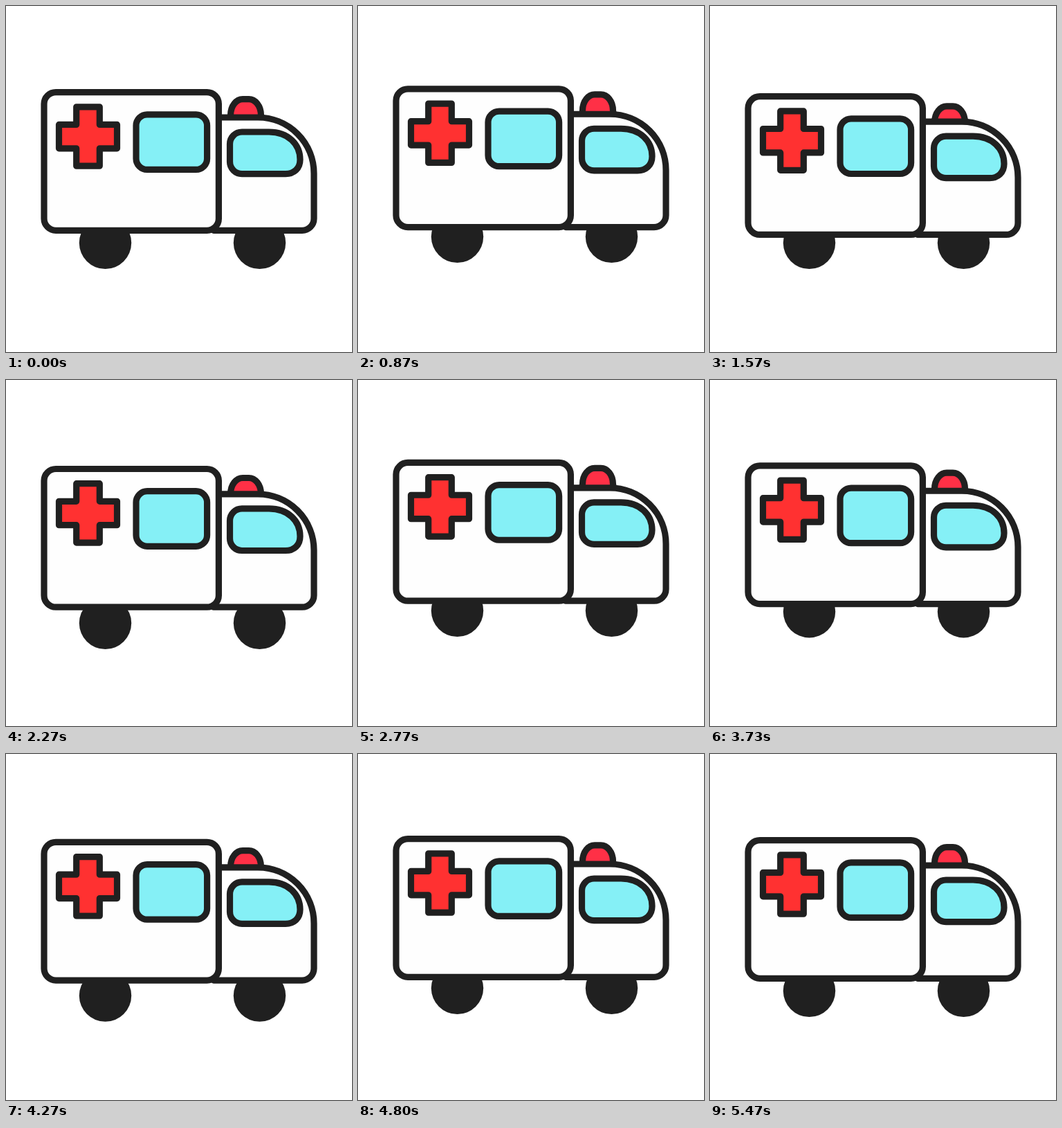
Animation, 500 px wide and 500 px high, one loop 5.83 s. Source, as an HTML page:

```html
<!DOCTYPE html>
<html lang="en">
<head>
<meta charset="utf-8">
<title>Ambulance</title>
<style>
html, body { margin: 0; width: 100%; height: 100%; overflow: hidden; background: #fff; }
svg { display: block; width: 100vw; height: 100vh; }
.ink { stroke: #202020; stroke-width: 9.2; stroke-linejoin: round; }
</style>
</head>
<body>
<svg viewBox="0 0 500 500">
  <g id="wheels" fill="#202020">
    <circle cx="143.5" cy="342.3" r="37.7"/>
    <circle cx="366.5" cy="342.3" r="37.7"/>
  </g>
  <path id="lamp" class="ink" fill="#ff3046" d="M321 176L324.5 158C324.5 144 333 134.6 342 134.6h9C360 134.6 368.5 144 368.5 158L372 176Z"/>
  <g id="body" class="ink" fill="#fefefe">
    <path d="M300 161H364A81 81 0 0 1 445 242V307.3a17 17 0 0 1-17 17H300Z"/>
    <rect x="55" y="124.6" width="252.4" height="199.7" rx="17"/>
    <path fill="#ff3131" d="M101.7 145.8h33.6v25.6h25.2v34.4h-25.2v25.4h-33.6v-25.4h-25.2v-34.4h25.2Z"/>
    <rect fill="#85f0f6" x="188" y="156.8" width="102.6" height="79.6" rx="16"/>
    <path fill="#85f0f6" d="M341 182H380C408 182 425 200 425 222C425 235 416 242.6 404 242.6H341a17.5 17.5 0 0 1-17.5-17.5V199.5a17.5 17.5 0 0 1 17.5-17.5Z"/>
  </g>
</svg>
<script>
const LOOP = 5830, STEP = 66;
const bars = [100, 730, 1370, 2000, 2670, 3300, 3930, 4570, 5200];

// time in ms -> bounce cycles completed
const cycles = [[100, 0], [870, 0.75], [3200, 3.25], [3300, 3.25], [4270, 4.25], [5470, 5.42]];

const parts = [
  { id: 'wheels', amp: 9, lag: 0, mid: 0 },
  { id: 'body', amp: 8, lag: 0.153, mid: -0.5 },
  { id: 'lamp', amp: 12.5, lag: 0.153, mid: 0 }
].map(p => ({ ...p, el: document.getElementById(p.id) }));

const clamp = v => Math.min(1, Math.max(0, v));

function phaseAt(t) {
  let i = 1;
  while (i < cycles.length - 1 && t > cycles[i][0]) i++;
  const [t0, c0] = cycles[i - 1], [t1, c1] = cycles[i];
  return c0 + (c1 - c0) * clamp((t - t0) / (t1 - t0));
}

// hold each pose for one step, restarting the count at every bar
function snap(t) {
  const start = bars.filter(b => b <= t).pop();
  return start === undefined ? 0 : start + Math.floor((t - start) / STEP) * STEP;
}

function draw(now) {
  const time = now % LOOP;
  const t = snap(time);
  const swing = time >= 5466 ? 0 : clamp((t - 100) / 440) * clamp((5480 - t) / 1600);
  const phase = phaseAt(t);
  for (const { el, amp, lag, mid } of parts) {
    const own = phase - lag;
    const y = own > 0 ? swing * (mid + amp * Math.sin(own * 2 * Math.PI)) : 0;
    el.setAttribute('transform', `translate(0 ${y.toFixed(2)})`);
  }
}

const begin = performance.now();
(function tick() {
  draw(performance.now() - begin);
  requestAnimationFrame(tick);
})();
</script>
</body>
</html>
```
